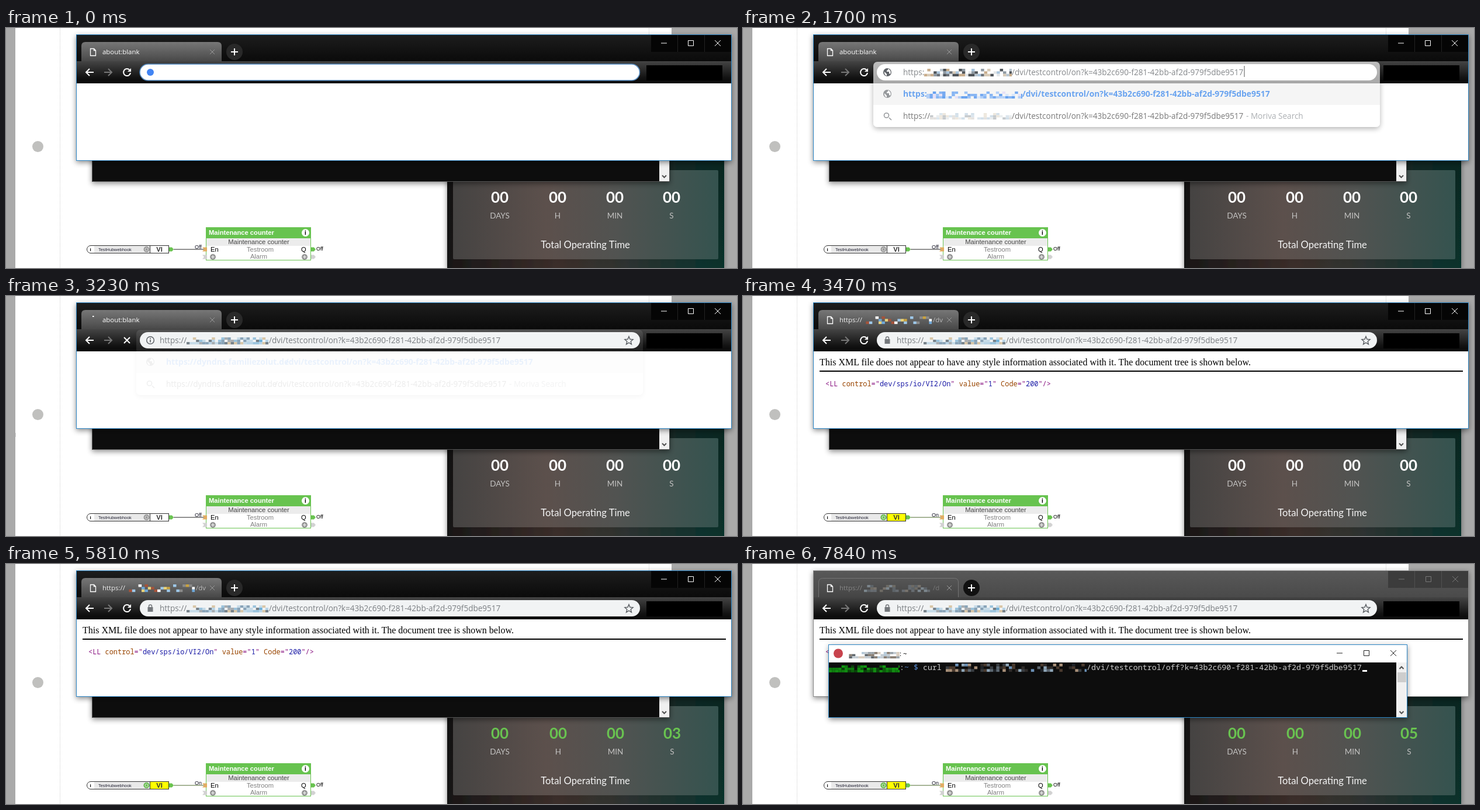
Write an HTML page that moves like this. It is 1251 px wide and 412 px high and loops after 8000 ms.

```html
<!DOCTYPE html>
<html lang="en">
<head>
<meta charset="utf-8">
<title>Webhook demo</title>
<style>
html, body { margin: 0; width: 100%; height: 100%; overflow: hidden; background: #fff; }
svg { display: block; width: 1251px; height: 412px; }
text { font: 13.55px "Open Sans", sans-serif; white-space: pre; }
.tab { font-size: 11.4px; }
.bold { font-size: 13.85px; font-weight: 700; }
.arial { font: 11.2px "Liberation Sans", sans-serif; }
.small { font-size: 9px; }
.serif { font: 16px "Liberation Serif", serif; }
.code { font: 11.91px "Noto Sans Mono", monospace; }
.term { font: 13.3px "Noto Sans Mono", monospace; }
.lato { font: 13.5px Lato, sans-serif; text-anchor: middle; fill: #c3c2c1; }
.digits { font-size: 26px; font-weight: 700; fill: #fff; }
.mid { text-anchor: middle; }
.line { fill: none; stroke-width: 1; }
.icon { fill: none; stroke-width: 2; }
</style>
</head>
<body>
<svg viewBox="0 0 1251 412">
<defs>
  <linearGradient id="title" x2="0" y2="1"><stop stop-color="#1d1d1d"/><stop offset="1" stop-color="#0a0a0a"/></linearGradient>
  <linearGradient id="titleOff" x2="0" y2="1"><stop stop-color="#585858"/><stop offset="1" stop-color="#4a4a4a"/></linearGradient>
  <linearGradient id="bar" x2="0" y2="1"><stop stop-color="#444"/><stop offset=".75" stop-color="#121212"/><stop offset="1" stop-color="#080808"/></linearGradient>
  <linearGradient id="tab" x2="0" y2="1"><stop stop-color="#777"/><stop offset="1" stop-color="#474747"/></linearGradient>
  <linearGradient id="tabOff" x2="0" y2="1"><stop stop-color="#565656"/><stop offset="1" stop-color="#444"/></linearGradient>
  <linearGradient id="panel"><stop stop-color="#181616"/><stop offset=".4" stop-color="#3b2e2a"/><stop offset=".65" stop-color="#2d3230"/><stop offset="1" stop-color="#06302c"/></linearGradient>
  <linearGradient id="card"><stop stop-color="#454342"/><stop offset=".35" stop-color="#5c504c"/><stop offset=".62" stop-color="#515351"/><stop offset="1" stop-color="#35534f"/></linearGradient>
  <linearGradient id="dim" x2="0" y2="1"><stop stop-color="#000" stop-opacity=".25"/><stop offset="1" stop-color="#000" stop-opacity="0"/></linearGradient>
  <filter id="shadow" x="-10%" y="-20%" width="120%" height="150%"><feDropShadow dx="0" dy="3" stdDeviation="5" flood-opacity=".45"/></filter>
  <g id="globe"><circle r="7" fill="#5f6368"/><path d="M-5-1-1 3v3C-4 5-5.500 2-5-1ZM1-6v2l-2 1v2h4v3l2 1C7 0 5-5 1-6Z" fill="#fff"/></g>
  <path id="pin" d="M0-3.500h5L8 0 5 3.500H0Z"/>
  <path id="notch" d="M-5-3.500h8v7h-8l3-3.500Z"/>
  <g id="plus"><circle r="5" fill="#969696"/><path d="M-3 0h6M0-3v6" stroke="#fff"/></g>
  <path id="down" d="m-3.500-2 3.500 3.500L3.500-2" fill="none" stroke="#505050" stroke-width="2"/>
  <g id="buttons" fill="none"><path d="M-51 0h10M41-5l10 10M51-5 41 5"/><path d="M-4.500-4.500h9v9h-9Z"/></g>
</defs>

<!-- Desktop -->
<path d="M0 0h16v412H0ZM1139 0h112v412h-112Z" fill="#a9a9a9"/>
<path d="M92.500 0v412M1100.500 0v11" stroke="#d0d0d0" stroke-dasharray="1 1"/>
<circle cx="54.500" cy="203.500" r="9.500" fill="#c0c0be"/>
<path d="M16.500 235v7" stroke="#d4d4d4" data-on="2930-3310 6900-7150 7300-7840"/>

<!-- Operating time panel -->
<g>
  <rect x="755" y="200" width="474" height="212" fill="url(#panel)" filter="url(#shadow)"/>
  <rect x="755" y="228" width="474" height="184" fill="url(#dim)"/>
  <rect x="765" y="244" width="454" height="153" rx="2" fill="url(#card)"/>
  <g id="counter"></g>
  <text class="lato" x="991.500" y="378" style="font-size:16.600px;fill:#f4f4f4">Total Operating Time</text>
</g>

<!-- Logic blocks -->
<g>
  <path d="M287 380h55" data-on="0-3390" stroke="#222"/>
  <path d="M287 380h55" data-on="3390-8000" stroke="#4f6a2e"/>
  <path d="M246 373.500H145a6.500 6.500 0 0 0 0 13h101Z" fill="#fff" stroke="#333"/>
  <path d="M151 374h95v12h-95Z" fill="#e9e9e9"/>
  <text class="arial mid" x="144.500" y="383" style="font-size:8px;font-weight:700">i</text>
  <text class="arial" x="158" y="383" style="font-size:7.400px" fill="#223">TestHubwebhook</text>
  <rect x="246.500" y="373.500" width="32" height="13" fill="#fff" stroke="#333"/>
  <rect x="247" y="374" width="31" height="12" fill="#ff0" data-on="3390-8000"/>
  <circle cx="240.500" cy="380" r="5" fill="#999"/>
  <circle cx="240.500" cy="380" r="5" fill="#69c350" data-on="3390-8000"/>
  <circle class="line" cx="240.500" cy="380" r="2.500" stroke="#ddd"/>
  <text class="arial mid" x="262.500" y="384" style="font-weight:700" fill="#333">VI</text>
  <use href="#pin" x="279" y="380" fill="#69c350"/>
  <text class="arial small" x="323" y="379" data-on="0-3390" fill="#112">Off</text>
  <text class="arial small" x="323" y="379" data-on="3390-8000" fill="#112">On</text>
  <rect x="342.500" y="342.500" width="179" height="56" fill="#fff" stroke="#69c350"/>
  <path d="M342 342h180v19H342Z" fill="#67c34f"/>
  <path d="M343 361h178v13H343Z" fill="#ececec"/>
  <text class="arial" x="347" y="355" style="font-weight:700" fill="#fff">Maintenance counter</text>
  <circle cx="512.500" cy="351.500" r="6.500" fill="#fff"/>
  <text class="arial mid" x="512.500" y="355" style="font-size:10px;font-weight:700">i</text>
  <text class="arial mid" x="432.500" y="371" fill="#444">Maintenance counter</text>
  <text class="arial" x="350" y="384">En</text>
  <text class="arial mid" x="435" y="384" fill="#808080">Testroom</text>
  <text class="arial" x="505" y="384">Q</text>
  <text class="arial mid" x="432.500" y="396" fill="#808080">Alarm</text>
  <use href="#notch" x="341" y="380" fill="#e2ad62"/>
  <use href="#notch" x="341" y="393" fill="#d2d2d2"/>
  <use href="#plus" x="354" y="393"/><use href="#plus" x="511" y="393"/>
  <use href="#pin" x="522" y="380" fill="#69c350"/>
  <use href="#pin" x="522" y="393" fill="#d2d2d2"/>
  <text class="arial small" x="531" y="382">Off</text>
</g>

<!-- Terminal behind the browser -->
<g data-on="0-5950">
  <rect x="147" y="200" width="989" height="64" fill="#0c0c0c" filter="url(#shadow)"/>
  <path d="M1118 228h17v35h-17Z" fill="#f0f0f0"/>
  <path class="line" d="M147.500 228v35.500h988V228" stroke="#555"/>
  <use href="#down" x="1126.500" y="255"/>
</g>

<!-- Browser -->
<g>
  <rect x="120" y="11" width="1122" height="217" fill="#fff" filter="url(#shadow)"/>
  <g data-on="0-5950">
    <path d="M121 12h1120v46H121Z" fill="url(#title)"/>
    <path d="M129 58V31q0-7 7-7h226q7 0 7 7v27Z" fill="url(#tab)"/>
    <path d="M1104 12h137v29h-137Z" fill="#050505"/>
    <path d="M1149.500 12v29M1195.500 12v29" stroke="#222"/>
    <use href="#buttons" x="1172" y="26" stroke="#fff"/>
  </g>
  <g data-on="5950-8000">
    <path d="M121 12h1120v46H121Z" fill="url(#titleOff)"/>
    <path d="M129.500 58V31q0-6.500 7-6.500h225q7 0 7 6.500v27Z" fill="url(#tabOff)" stroke="#747474"/>
    <path d="M1104 12h137v29h-137Z" fill="#3c3c3c"/>
    <path d="M1149.500 12v29M1195.500 12v29" stroke="#505050"/>
    <use href="#buttons" x="1173" y="26" stroke="#777"/>
  </g>
  <path d="M121 57h1120v38H121Z" fill="url(#bar)"/>
  <path d="M1096 64h130v26h-130Z"/>
  <circle cx="391" cy="41" r="14" fill="#292929" data-on="0-5950"/>
  <circle cx="391" cy="41" r="14" fill="#111" data-on="5950-8000"/>
  <path class="icon" d="M385 41h12M391 35v12" stroke="#fff"/>
  <path class="line" d="m349 37 8 8m0-8-8 8" stroke="#999"/>
  <path class="line" d="M144.500 35.500h6l3 3v9h-9Zm6 0v3h3" stroke="#fff" style="stroke-width:1.300" data-on="0-3160 3310-8000"/>
  <rect x="148" y="34" width="2.500" height="2" fill="#fff" data-on="3160-3310"/>
  <text class="tab" x="165" y="45" fill="#fff" data-on="0-3310">about:blank</text>
  <g data-on="3310-5950">
    <text class="tab" x="165" y="45" fill="#eee">https://</text>
    <text class="tab" x="325" y="45" fill="#bbb">/dv</text>
    <g id="tabHost"></g>
  </g>
  <g data-on="5950-8000">
    <text class="tab" x="165" y="45" fill="#858585">https://</text>
    <text class="tab" x="325" y="45" fill="#777">/d</text>
    <g id="tabHostOff"></g>
  </g>
  <path class="icon" d="M150 76h-13m6-6-6 6 6 6" stroke="#fff"/>
  <path class="icon" d="M168 76h13m-6-6 6 6-6 6" stroke="#777"/>
  <g data-on="0-3160 3310-8000"><path class="icon" d="M211.500 72a6 6 0 1 0 1.500 5" stroke="#fff"/><path d="M214 69v6h-6Z" fill="#fff"/></g>
  <path class="icon" d="m202 71 10 10m0-10-10 10" stroke="#fff" data-on="3160-3310"/>

  <!-- Loaded page -->
  <g data-on="3310-8000">
    <text class="serif" x="131" y="119">This XML file does not appear to have any style information associated with it. The document tree is shown below.</text>
    <path d="M131 128h1101v2H131Z"/>
    <text class="code" x="141" y="155" fill="#881280">&lt;LL <tspan class="key">control</tspan>="<tspan class="val">dev/sps/io/VI2/On</tspan>" <tspan class="key">value</tspan>="<tspan class="val">1</tspan>" <tspan class="key">Code</tspan>="<tspan class="val">200</tspan>"/&gt;</text>
  </g>

  <!-- Suggestions -->
  <g id="popup">
    <rect x="223" y="58" width="867" height="112" rx="7" fill="#fff" filter="url(#shadow)"/>
    <path d="M223 94h867v38H223Z" fill="#f1f1f1"/>
    <use href="#globe" x="247" y="113"/>
    <path class="icon" d="M250 154l4 4M249.500 150a4 4 0 1 0-8 0 4 4 0 1 0 8 0" stroke="#5f6368" style="stroke-width:1.600"/>
    <text class="bold" x="478" y="118" fill="#1a73e8" data-path></text>
    <text x="460" y="156" fill="#333" data-path></text>
    <text x="861" y="156" fill="#80868b">- Moriva Search</text>
    <g data-on="1700-3160">
      <text class="bold" x="274" y="118" fill="#1a73e8">https:</text>
      <text x="274" y="156" fill="#333">https://</text>
      <g id="hostBlue"></g><g id="hostSoft"></g>
    </g>
    <g data-on="3160-3310">
      <text class="bold" x="274" y="118" fill="#1a73e8">https://dyndns.familiezolut.de</text>
      <text x="274" y="156" fill="#333">https://dyndns.familiezolut.de</text>
    </g>
  </g>

  <!-- Address field -->
  <rect id="field" x="229" y="62" width="856" height="28" rx="14"/>
  <g data-on="0-1700">
    <rect class="line" x="229" y="62" width="855.500" height="28" rx="14" stroke="#5288bd" style="stroke-width:1.500"/>
    <circle cx="247" cy="76" r="6" fill="#4285f4"/>
  </g>
  <path d="M263.500 65v19" stroke="#333" data-on="150-710 1240-1700"/>
  <g data-on="1700-3160">
    <use href="#globe" x="247" y="76"/>
    <text x="274" y="81" fill="#85888b">https:</text>
    <text x="460" y="81" fill="#85888b" data-path></text>
    <g id="hostTyped"></g>
  </g>
  <path d="M858 65v19" stroke="#555" data-on="1700-2220 2770-3160"/>
  <g data-on="3160-8000">
    <text x="263" y="81" fill="#7b7f83">https://</text>
    <text x="450" y="81" fill="#7b7f83" data-path></text>
    <g id="hostLoaded"></g>
    <path class="line" d="m1066 69.500 2 4.700 5 .4-3.800 3.300 1.200 5-4.400-2.700-4.400 2.700 1.200-5-3.800-3.300 5-.4Z" stroke="#5f6368" style="stroke-width:1.500"/>
  </g>
  <g data-on="3160-3310"><circle class="line" cx="247" cy="76" r="6.300" stroke="#5f6368" style="stroke-width:1.500"/><path d="M247 75v4.500M247 72v1.800" stroke="#5f6368" stroke-width="1.700"/></g>
  <g data-on="3310-8000"><path d="M242.500 74h9v8h-9Z" fill="#74787c"/><path class="line" d="M244.500 75v-2.500a2.500 2.500 0 0 1 5 0V75" stroke="#74787c" style="stroke-width:1.500"/></g>
  <rect class="line" x="120.500" y="11.500" width="1121" height="216" stroke="#2c86c6" data-on="0-5950"/>
  <rect class="line" x="120.500" y="11.500" width="1121" height="216" stroke="#8a8a8a" data-on="5950-8000"/>
</g>

<!-- Terminal in front -->
<g data-on="5950-8000">
  <rect x="147" y="138" width="990" height="126" fill="#0c0c0c" filter="url(#shadow)"/>
  <path d="M147 139h989v30H147Z" fill="#fff"/>
  <path d="M1118 169h18v94h-18Z" fill="#f0f0f0"/>
  <path d="M1120 186h15v17h-15Z" fill="#cdcdcd"/>
  <use href="#down" x="1127" y="255"/>
  <use href="#down" transform="translate(1127 178) scale(1 -1)"/>
  <rect class="line" x="146.500" y="138.500" width="990" height="125" stroke="#2c86c6"/>
  <use href="#buttons" x="1067" y="153" stroke="#222"/>
  <circle cx="163" cy="153.500" r="8" fill="#c8434d"/>
  <text class="tab" x="268" y="158">: ~</text>
  <text class="term" x="268" y="182" fill="#ccc">: <tspan x="276" fill="#5a8fd8">~ $</tspan> curl</text>
  <text class="term" x="588" y="182" fill="#ccc">/dvi/testcontrol/off?k=43b2c690-f281-42bb-af2d-979f5dbe9517</text>
  <g id="termTitle"></g><g id="termUser"></g><g id="termHost"></g>
  <rect x="1060" y="182" width="8" height="3" fill="#fff" data-on="6500-8000"/>
</g>
</svg>
<script>
const LOOP = 8000;
const $ = id => document.getElementById(id);
const all = query => [...document.querySelectorAll(query)];

function add(parent, tag, attrs, text = '') {
  const el = document.createElementNS('http://www.w3.org/2000/svg', tag);
  for (const key in attrs) el.setAttribute(key, attrs[key]);
  el.textContent = text;
  return parent.appendChild(el);
}

// Seeded blocks that blur a piece of text; the lower rows are fuller.
function mosaic(id, x, y, w, h, colors, fill, seed) {
  const random = () => (seed = seed * 16807 % 2147483647) / 2147483647;
  const list = colors.split(' '), cell = 5.4, rows = 3;
  for (let cx = 0; cx < w; cx += cell)
    for (let row = 0; row < rows; row++) {
      const color = list[Math.floor(random() * list.length)];
      if (random() > fill * (0.55 + row * 0.3)) continue;
      add($(id), 'rect', { x: x + cx, y: y + row * h / rows,
        width: Math.min(cell, w - cx) + 0.1, height: h / rows + 0.1, fill: '#' + color });
    }
}
mosaic('hostTyped', 310, 70, 150, 13, 'b9c6d0 8f9aa3 d8cbb8 6b7178 a8c4dc c9ad8c 4e5358 e3e6e8', .75, 311);
mosaic('hostBlue', 314, 109, 164, 12, '1a73e8 4a90ee 8db8f4 6ba5f0 c5dbf9 2f7de9 d9d2f4', .7, 727);
mosaic('hostSoft', 320, 146, 140, 11, 'c9d9e6 d6d3d0 e6dccd a9aeb3 bcd0e0 dfe4e8', .7, 1213);
mosaic('hostLoaded', 309, 71, 140, 12, '8aa4b8 b9d4e6 6fb0d8 a8adb1 d9c7a8 c6dbe8 78838b 9cc4dd', .9, 2239);
mosaic('tabHost', 205, 35, 118, 13, '6fa8d8 c9a23f a5533a 9dc7e8 e8d27a 3b67a5 ffffff 8a8a8a', .38, 911);
mosaic('tabHostOff', 207, 36, 113, 12, '666b70 77726c 5d6368 7b858c 6d6a64', .6, 523);
mosaic('termTitle', 176, 151, 92, 11, '9aa3aa c2cbd2 8a7f74 b5c9d8 d8cdbf 5f666c', .8, 1009);
mosaic('termUser', 147, 174, 121, 12, '0e7a0e 139613 0b5c0b 128a12 0a420a', .85, 433);
mosaic('termHost', 347, 171, 241, 14, '2e2a28 5b6670 1f2328 8fa6b8 4a3a2e 383c40 6a8fb5 a88f78', .55, 1601);

all('[data-path]').forEach(el => el.textContent = '/dvi/testcontrol/on?k=43b2c690-f281-42bb-af2d-979f5dbe9517');
all('.key').forEach(el => el.setAttribute('fill', '#994500'));
all('.val').forEach(el => el.setAttribute('fill', '#1a1aa6'));

const columns = [['DAYS', 845], ['H', 944], ['MIN', 1042], ['S', 1139]].map(([label, x], i) => ({
  x, shift: i && 1,
  digits: add($('counter'), 'text', { class: 'lato digits', y: 300 }, '00'),
  label: add($('counter'), 'text', { class: 'lato', y: 327 }, label)
}));

const timed = all('[data-on]').map(el => ({
  el, spans: el.dataset.on.split(' ').map(span => span.split('-').map(Number))
}));

// Value of the last step that has begun.
const step = (t, steps) => steps.reduce((value, [start, next]) => t >= start ? next : value, 0);
const popupSteps = [[1700, .65], [1760, 1], [3160, .45], [3230, .09], [3310, 0]];
const fieldSteps = [[0, '#fff'], [3160, '#f1f3f4'], [5110, '#eceef0'], [5180, '#e8eaed'], [5250, '#f1f3f4']];
const secondSteps = [[3780, 1], [4870, 2], [5810, 3], [6880, 4], [7770, 5]];

function draw(t) {
  for (const { el, spans } of timed)
    el.style.display = spans.some(([from, to]) => t >= from && t < to) ? '' : 'none';
  $('popup').setAttribute('opacity', step(t, popupSteps));
  $('field').setAttribute('fill', step(t, fieldSteps));
  const seconds = step(t, secondSteps);
  for (const { x, shift, digits, label } of columns) {
    const cx = x + (seconds ? shift : 0);
    digits.setAttribute('x', cx);
    label.setAttribute('x', cx);
    digits.style.fill = seconds ? '#69c350' : '#fff';
  }
  columns[3].digits.textContent = String(seconds).padStart(2, '0');
}

const start = performance.now();
function frame() {
  draw((performance.now() - start) % LOOP);
  requestAnimationFrame(frame);
}
frame();
</script>
</body>
</html>
```
